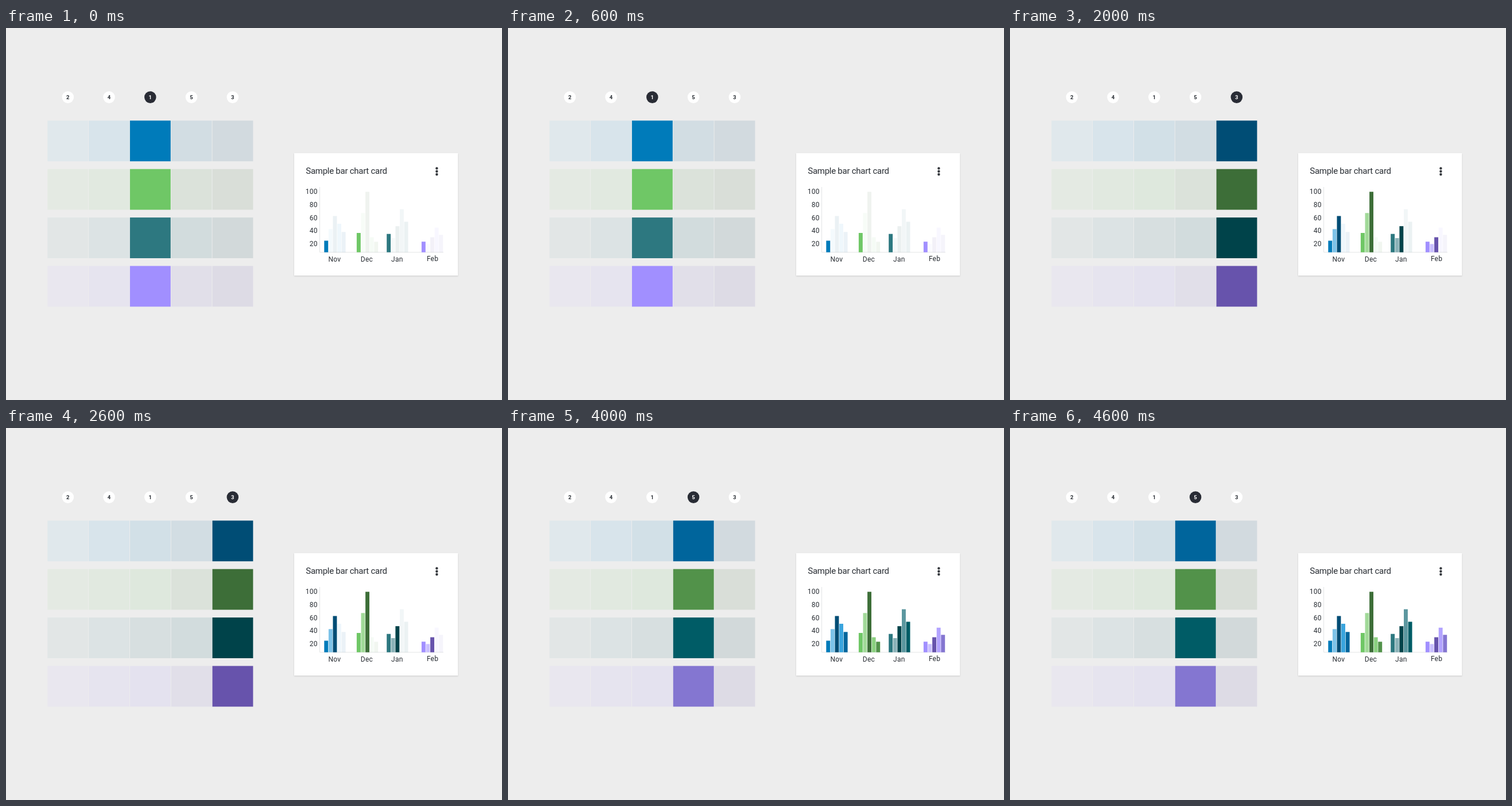
An HTML page for the animation above (5000 ms loop, 864 px wide and 648 px high).

```html
<!DOCTYPE html>
<html lang="en">
<head>
<meta charset="utf-8">
<title>Chart palette order</title>
<style>
  html, body { margin: 0; width: 100%; height: 100%; overflow: hidden; background: #ededed; }
  svg { display: block; width: 864px; height: 648px; }
  text { font-family: Roboto, "Open Sans", sans-serif; fill: #292e34; }
  .title { font-size: 15px; letter-spacing: -.27px; }
  .label { font-size: 12px; letter-spacing: .2px; }
  .num { font-size: 9.5px; font-weight: 700; text-anchor: middle; }
  .mid { text-anchor: middle; }
  .end { text-anchor: end; }
  .card { fill: #fff; filter: drop-shadow(0 1px 1px rgba(0, 0, 0, .16)); }

  .cell, .disc, .num, .bar { animation: 5s step-end infinite; }
  .cell { --dim: .11; animation-name: cell; }
  .disc { animation-name: disc; }
  .num { animation-name: num; }
  .bar { --dim: .075; }
  .bar2 { animation-name: from1; }
  .bar3 { animation-name: from2; }
  .bar4 { animation-name: from3; }
  .bar5 { animation-name: from4; }

  @keyframes cell { 0% { opacity: 1; } 20%, 100% { opacity: var(--dim); } }
  @keyframes disc { 0% { fill: #292c35; } 20%, 100% { fill: #fff; } }
  @keyframes num { 0% { fill: #fff; } 20%, 100% { fill: #292e34; } }
  @keyframes from1 { 0% { opacity: var(--dim); } 20%, 100% { opacity: 1; } }
  @keyframes from2 { 0% { opacity: var(--dim); } 40%, 100% { opacity: 1; } }
  @keyframes from3 { 0% { opacity: var(--dim); } 60%, 100% { opacity: 1; } }
  @keyframes from4 { 0% { opacity: var(--dim); } 80%, 100% { opacity: 1; } }
</style>
</head>
<body>
<svg viewBox="0 0 864 648">
  <g id="palette"></g>
  <rect class="card" x="502" y="218" width="285.3" height="213.3"/>
  <text class="title" x="522.3" y="254.3">Sample bar chart card</text>
  <g fill="#35383d">
    <circle cx="750.4" cy="244.4" r="2.2"/>
    <circle cx="750.4" cy="249.7" r="2.2"/>
    <circle cx="750.4" cy="255" r="2.2"/>
  </g>
  <path d="M546.5 277V390.7H762" fill="none" stroke="#e3e5e6"/>
  <g id="chart"></g>
</svg>
<script>
  // Each series lists its shades in the order they are used, 1 to 5.
  const series = [
    { month: "Nov", x: 554.3, labelX: 572.3, labelY: 407, tops: [370.5, 350.3, 327.5, 341, 355.3],
      shades: ["#007bba", "#7dc3e8", "#004d75", "#3aa5de", "#00659c"] },
    { month: "Dec", x: 610.9, labelX: 628.4, labelY: 407, tops: [357, 322.3, 285.3, 364.5, 372.3],
      shades: ["#6fc766", "#a2da99", "#3d6e38", "#8bd080", "#52924a"] },
    { month: "Jan", x: 663.2, labelX: 681.3, labelY: 407, tops: [358.7, 366, 345.2, 315.7, 337.5],
      shades: ["#2d7880", "#8cb3b8", "#00434a", "#5c979f", "#005c66"] },
    { month: "Feb", x: 723.9, labelX: 743, labelY: 406.3, tops: [372.2, 376.3, 364.5, 347.8, 360.3],
      shades: ["#a18fff", "#cac0ff", "#6753ac", "#b2a3ff", "#8476d1"] }
  ];
  const order = [2, 4, 1, 5, 3];
  const floor = 390.7;
  const palette = document.getElementById("palette");
  const chart = document.getElementById("chart");

  function add(parent, tag, attrs, text = "") {
    const node = document.createElementNS("http://www.w3.org/2000/svg", tag);
    for (const key in attrs) node.setAttribute(key, attrs[key]);
    node.textContent = text;
    parent.append(node);
  }

  order.forEach((rank, col) => {
    const x = 72.3 + 71.8 * col;
    const cx = 107.8 + 71.75 * col;
    const style = `animation-delay: ${rank - 6}s`;
    add(palette, "circle", { class: "disc", cx, cy: 120.6, r: 10.3, style });
    add(palette, "text", { class: "num", x: cx, y: 124, style }, rank);
    series.forEach((s, row) => add(palette, "rect", {
      class: "cell", x, y: 161.3 + 84.4 * row, width: 70.9, height: 70.9,
      fill: s.shades[rank - 1], style
    }));
  });

  [100, 80, 60, 40, 20].forEach((value, i) =>
    add(chart, "text", { class: "label end", x: 542.7, y: 288.9 + 22.8 * i }, value));

  for (const s of series) {
    add(chart, "text", { class: "label mid", x: s.labelX, y: s.labelY }, s.month);
    s.tops.forEach((top, i) => add(chart, "rect", {
      class: `bar bar${i + 1}`, x: s.x + 7.6 * i, y: top, width: 6.9, height: floor - top,
      fill: s.shades[i]
    }));
  }
</script>
</body>
</html>
```
